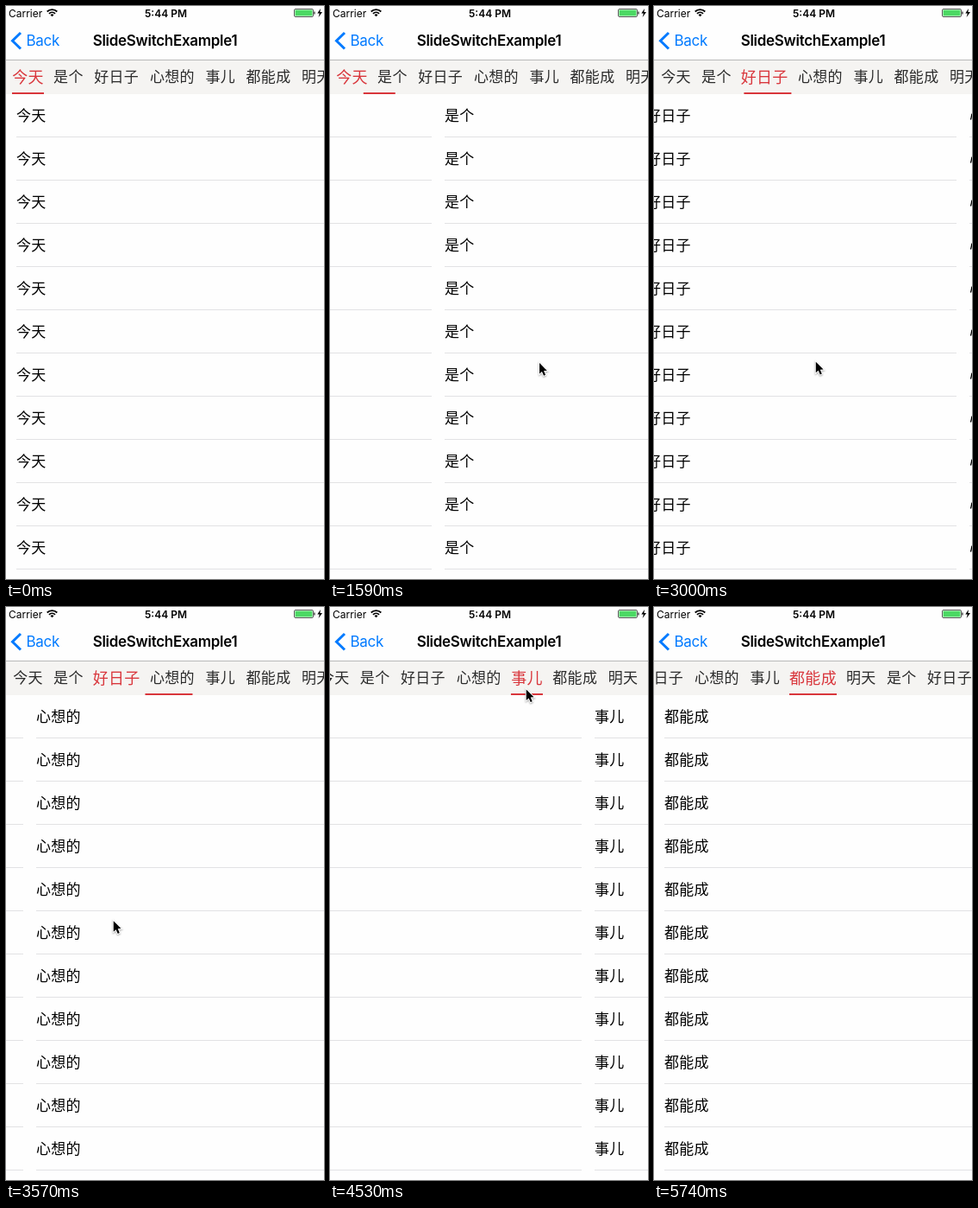
Write an HTML page with a canvas that moves like this. It is 369 px wide and 663 px high and loops after 6830 ms.

```html
<!DOCTYPE html>
<html lang="zh-CN">
<head>
<meta charset="utf-8">
<style>
  html, body { margin: 0; width: 100%; height: 100%; overflow: hidden; background: #fefefe; }
  canvas { display: block; }
</style>
</head>
<body>
<canvas id="stage" width="369" height="663"></canvas>
<script>
const ctx = document.getElementById('stage').getContext('2d');
const W = 369, H = 663, LOOP = 6830;
const PAGE = 375, INSET = -3, MID = 184.5;
const RED = '#d9363c', BLUE = '#007aff';
const LATIN = 'Inter, sans-serif';
const HAN = '"Noto Sans CJK SC", "Noto Sans CJK", "Noto Sans CJK JP", sans-serif';
const HAN_SPACING = 0.3;

const smooth = u => u * u * (3 - 2 * u);
const out = u => 1 - (1 - u) ** 3;
const linear = u => u;
const mix = (a, b, u) => a + (b - a) * u;

// Keys are [time, easing into this key, ...values].
function track(keys, t) {
  const next = keys.findIndex(k => k[0] > t);
  if (next === 0) return keys[0].slice(2);
  if (next < 0) return keys[keys.length - 1].slice(2);
  const a = keys[next - 1], b = keys[next];
  const u = b[1]((t - a[0]) / (b[0] - a[0]));
  return a.slice(2).map((v, i) => mix(v, b[i + 2], u));
}

let edge = 2.05;
const tabs = ['今天', '是个', '好日子', '心想的', '事儿', '都能成', '明天', '是个', '好日子'].map(name => {
  const cell = 17.8 * name.length + 11.3;
  const tab = { name, center: edge + cell / 2, bar: name.length * 18 + 1 };
  edge += cell;
  return tab;
});
const centered = i => Math.max(0, tabs[i].center - MID);

const TAP = 4420;
const selectTimes = [1820, 2750, 3720, TAP, 5160];

const pageKeys = [
  [910, linear, 0], [1300, smooth, 0.31], [1525, linear, 0.31], [1820, out, 1],
  [1970, linear, 1], [2170, smooth, 1.277], [2400, linear, 1.277], [2750, out, 2],
  [2940, linear, 2], [3150, smooth, 2.28], [3380, linear, 2.28], [3720, out, 3],
  [4430, linear, 3], [4770, smooth, 4],
  [5200, linear, 4], [5560, smooth, 5]
];
const stripKeys = [
  [3720, linear, 0], [4010, smooth, centered(3)],
  [4430, linear, centered(3)], [4770, smooth, centered(4)],
  [5200, linear, centered(4)], [5560, smooth, centered(5)]
];
const pointerKeys = [
  [320, linear, 374, 393], [540, out, 289, 410],
  [910, linear, 289, 410], [1300, smooth, 172, 415],
  [1480, linear, 172, 415], [1590, linear, 241.5, 411.5], [1820, out, 285, 411],
  [1970, linear, 285, 411], [2170, smooth, 181, 419.5],
  [2430, linear, 181, 419.5], [2760, smooth, 208, 409],
  [2940, linear, 208, 409], [3150, smooth, 104, 415],
  [3400, linear, 104, 415], [4060, smooth, 222.5, 95],
  [4440, linear, 222.5, 95], [4800, smooth, 249, 88],
  [5260, linear, 249, 88], [5740, smooth, 382, 150]
];

function text(str, x, y, font, color, align = 'left', spacing = 0) {
  ctx.font = font;
  ctx.fillStyle = color;
  ctx.textAlign = align;
  ctx.letterSpacing = spacing + 'px';
  ctx.fillText(str, x, y);
}

function rect(x, y, w, h, color) {
  ctx.fillStyle = color;
  ctx.fillRect(x, y, w, h);
}

function trace(points, close) {
  ctx.beginPath();
  points.forEach(p => ctx.lineTo(...p));
  if (close) ctx.closePath();
}

function stroke(color, width) {
  ctx.strokeStyle = color;
  ctx.lineWidth = width;
  ctx.stroke();
}

function drawWifi() {
  const fan = r => ctx.arc(53.5, 12.3, r, -Math.PI * 0.75, -Math.PI * 0.25);
  for (const r of [8.2, 5]) {
    ctx.beginPath();
    fan(r);
    stroke('#000', 1.8);
  }
  ctx.beginPath();
  ctx.moveTo(53.5, 12.3);
  fan(2.8);
  ctx.fillStyle = '#000';
  ctx.fill();
}

function drawBattery() {
  ctx.beginPath();
  ctx.roundRect(334.5, 3.5, 22, 9, 1.5);
  stroke('#333', 0.8);
  rect(335.5, 4.5, 20, 7, '#4cd964');
  rect(357.3, 6.5, 1.3, 3, '#333');
  trace([[365, 3], [361.3, 8.6], [363.8, 8.6], [362.6, 13], [367, 7], [364.4, 7]], true);
  ctx.fillStyle = '#000';
  ctx.fill();
}

function drawHeader() {
  text('Carrier', 3, 12.5, '12px ' + LATIN, '#000');
  drawWifi();
  text('5:44 PM', 185.5, 12.5, '600 12px ' + LATIN, '#000', 'center');
  drawBattery();
  trace([[17, 31], [7.5, 40.3], [17, 49.5]]);
  stroke(BLUE, 3);
  text('Back', 23.5, 46, '17px ' + LATIN, BLUE, 'left', -0.3);
  text('SlideSwitchExample1', MID, 46, '600 17px ' + LATIN, '#000', 'center', -0.3);
  rect(0, 62, W, 1, '#b9b9b9');
}

function drawTabs(selected, position, strip) {
  rect(0, 63, W, 39, '#f5f4f2');
  tabs.forEach((tab, i) => {
    const on = i === selected;
    text(tab.name, tab.center - strip, on ? 89 : 88,
      (on ? '500 18px ' : '17px ') + HAN, on ? RED : '#2b2b2b', 'center', HAN_SPACING);
  });
  const i = Math.floor(position), u = position - i;
  const a = tabs[i], b = tabs[i + 1];
  const bar = mix(a.bar, b.bar, u);
  rect(mix(a.center, b.center, u) - strip - bar / 2, 100, bar, 2, RED);
}

function drawPage(i, scroll) {
  const left = Math.round((i - scroll) * PAGE + INSET);
  for (let y = 151; y < H; y += 50) {
    text(tabs[i].name, left + 15, y - 18, '17px ' + HAN, '#000', 'left', HAN_SPACING);
    rect(left + 15, y, PAGE - 15, 1, '#e2e2e4');
  }
}

function drawPointer(x, y) {
  ctx.save();
  ctx.translate(x + 1, y + 1.5);
  trace([[0, 0], [0, 12.5], [2.9, 10], [5, 14.7], [7, 13.8], [5, 9.1], [8.8, 8.9]], true);
  ctx.shadowColor = 'rgba(0,0,0,.35)';
  ctx.shadowBlur = 2;
  ctx.shadowOffsetY = 1;
  stroke('#fff', 2);
  ctx.shadowColor = 'transparent';
  ctx.fillStyle = '#000';
  ctx.fill();
  ctx.restore();
}

function draw(now) {
  const t = now % LOOP;
  const [scroll] = track(pageKeys, t);
  const [strip] = track(stripKeys, t);
  const selected = selectTimes.filter(s => t >= s).length;
  rect(0, 0, W, H, '#fefefe');
  drawPage(Math.floor(scroll), scroll);
  if (scroll % 1) drawPage(Math.ceil(scroll), scroll);
  drawTabs(selected, t < TAP ? scroll : selected, strip);
  drawHeader();
  drawPointer(...track(pointerKeys, t));
  requestAnimationFrame(draw);
}
requestAnimationFrame(draw);
</script>
</body>
</html>
```
